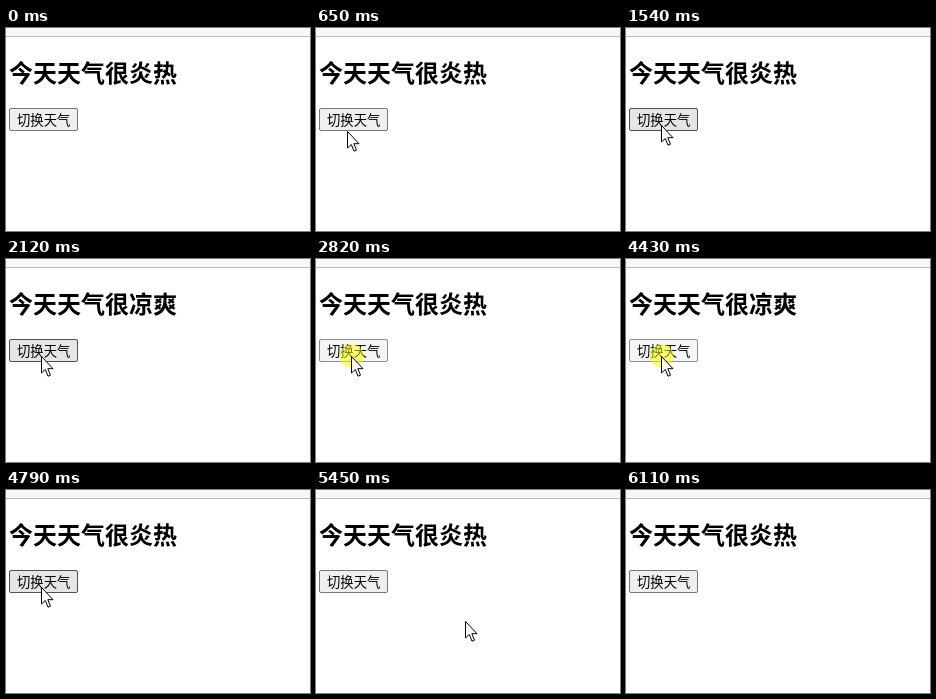
Recreate the animation shown at these times as an HTML page. Size 304 by 203 pixels, loop 6.33 s.

```html
<!DOCTYPE html>
<html lang="zh-CN">
<head>
<meta charset="utf-8">
<style>
  html, body { margin: 0; width: 100%; height: 100%; overflow: hidden; background: #fff; }
  svg { display: block; }
  text { font-family: "Noto Sans CJK SC", "Noto Sans CJK", sans-serif; }
  #title { font-size: 24px; font-weight: bold; }
  #label { font-size: 13.333px; font-weight: 350; }
  #button { fill: #efefef; stroke: #767676; }
  .hover #button { fill: #e5e5e5; stroke: #4f4f4f; }
  .pressed #button { fill: #f5f5f5; stroke: #8d8d8d; }
  #halo { fill: #ffff00; opacity: .5; visibility: hidden; }
  .pressed #halo { visibility: visible; }
</style>
</head>
<body>
<svg id="stage" width="304" height="203" viewBox="0 0 304 203">
  <rect width="304" height="8" fill="#f7f7f7"/>
  <rect y="8" width="304" height="1" fill="#bcbcbc"/>
  <text id="title" x="3" y="54"></text>
  <rect id="button" x="3.5" y="80.5" width="68" height="22" rx="1.5"/>
  <text id="label" x="11" y="97">切换天气</text>
  <circle id="halo" cx="35.5" cy="97" r="12"/>
  <path id="cursor" d="M.5 .5V17L4.3 13.5 7 20.2 9.5 19.2 6.8 12.7H12Z" fill="#fff" stroke="#000"/>
</svg>
<script>
const LOOP = 6330, HOLD = 80;
const $ = id => document.getElementById(id);

// Unhurried clicks, then a quick burst of four
const presses = [920, 1460, 2030, 2440, 2820, 3130, 3470, 3880];
for (let i = 0; i < 4; i++) presses.push(4210 + 160 * i);

// The pointer glides in, rests on the button and leaves again
const stops = [
  { t: 150, x: 269, y: 196 },
  { t: 650, x: 31, y: 103 },
  { t: 710, x: 35, y: 97 },
  { t: 5130, x: 35, y: 97 },
  { t: 5750, x: 251, y: 162 },
  { t: 6110, x: 287, y: 203 }
];

const ease = p => (1 - Math.cos(Math.PI * p)) / 2;

function pointerAt(t) {
  const i = stops.findIndex(s => s.t > t);
  if (i < 1) return { x: -50, y: 203 };
  const a = stops[i - 1], b = stops[i];
  const p = ease((t - a.t) / (b.t - a.t));
  const mix = k => Math.round(a[k] + (b[k] - a[k]) * p);
  return { x: mix("x"), y: mix("y") };
}

function draw(t) {
  const { x, y } = pointerAt(t);
  const started = presses.filter(p => t >= p).length;
  const released = presses.filter(p => t >= p + HOLD).length;

  $("title").textContent = "今天天气很" + (released % 2 ? "凉爽" : "炎热");
  $("stage").classList.toggle("hover", x < 72 && y < 103);
  $("stage").classList.toggle("pressed", started > released);
  $("cursor").setAttribute("transform", `translate(${x} ${y})`);
}

const start = performance.now();
function tick() {
  draw((performance.now() - start) % LOOP);
  requestAnimationFrame(tick);
}
tick();
</script>
</body>
</html>
```
